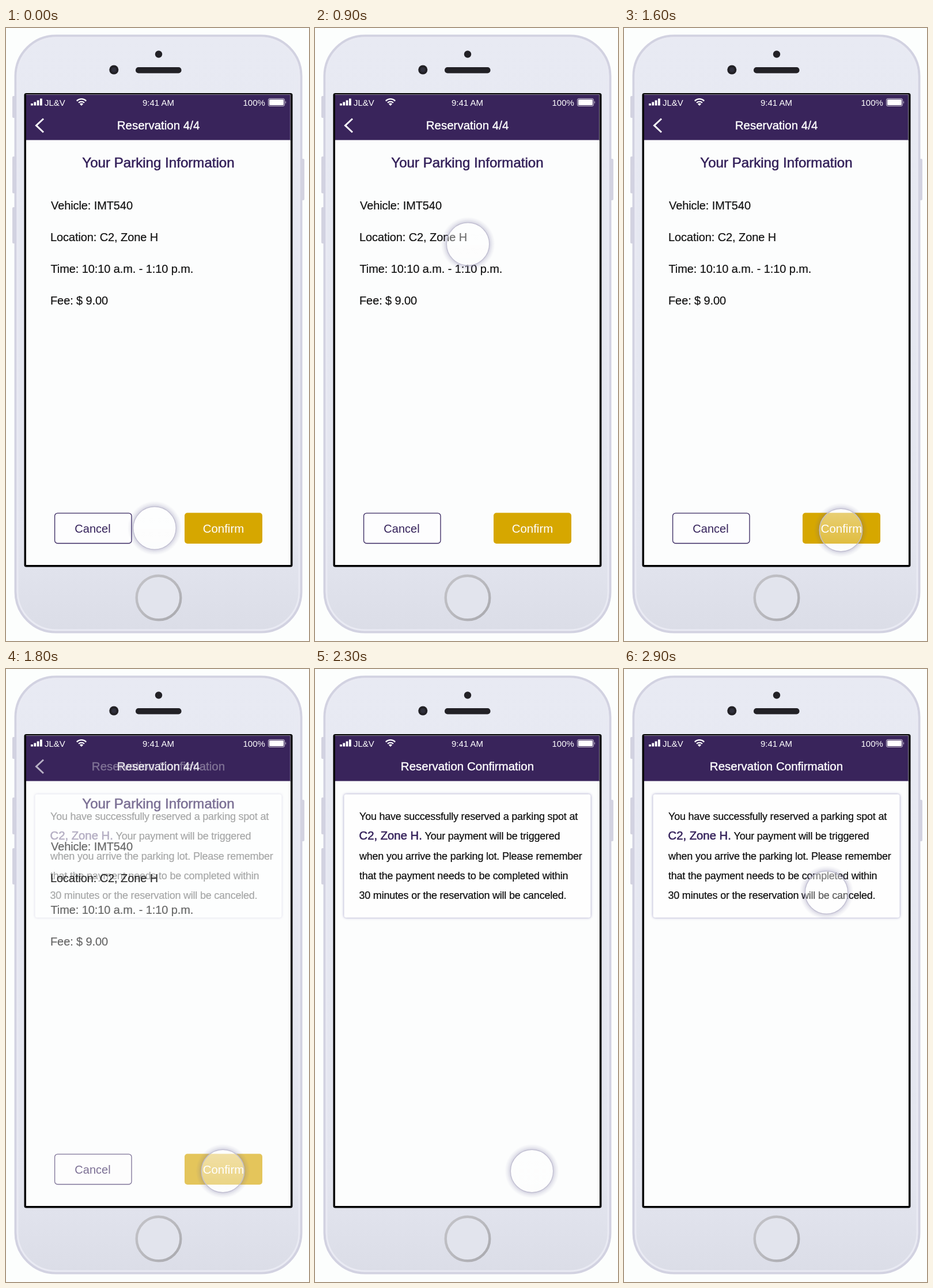
Write an HTML page that moves like this. It is 526x1064 px and loops after 3000 ms.

```html
<!DOCTYPE html>
<html lang="en">
<head>
<meta charset="utf-8">
<title>Parking reservation</title>
<style>
  html, body { margin: 0; width: 100%; height: 100%; overflow: hidden; background: #fcfefd; }
  svg { display: block; width: 100%; height: 100%; }
  text { font-family: "Liberation Sans", Arial, sans-serif; white-space: pre; }
  .mid { text-anchor: middle; }
  .status { font-size: 15px; fill: #fff; }
  .title { font-size: 20.5px; fill: #fff; stroke: #fff; stroke-width: .4px; }
  .info { font-size: 20px; letter-spacing: -.1px; fill: #111; stroke: #111; stroke-width: .2px; }
  .note { font-size: 18px; letter-spacing: -.22px; fill: #0c0c0c; stroke: #0c0c0c; stroke-width: .2px; }
  .strong { fill: #34215a; stroke: #34215a; stroke-width: .55px; }
</style>
</head>
<body>
<svg viewBox="0 0 526 1064">
  <defs>
    <linearGradient id="shell" x2="0" y2="1">
      <stop offset="0" stop-color="#e8eaf3"/>
      <stop offset=".85" stop-color="#e3e5ef"/>
      <stop offset="1" stop-color="#dbdde7"/>
    </linearGradient>
    <linearGradient id="metal" x2="1" y2="1">
      <stop offset="0" stop-color="#c3c3c8"/>
      <stop offset=".5" stop-color="#b9b9be"/>
      <stop offset="1" stop-color="#a8a8ad"/>
    </linearGradient>
    <linearGradient id="glass" x2="0" y2="1">
      <stop offset="0" stop-color="#fff" stop-opacity=".48"/>
      <stop offset="1" stop-color="#fff" stop-opacity=".2"/>
    </linearGradient>
    <radialGradient id="halo">
      <stop offset=".78" stop-color="#5f5990" stop-opacity="0"/>
      <stop offset=".79" stop-color="#5f5990" stop-opacity=".25"/>
      <stop offset=".9" stop-color="#5f5990" stop-opacity=".09"/>
      <stop offset="1" stop-color="#5f5990" stop-opacity="0"/>
    </radialGradient>
    <filter id="soft" x="-5%" y="-5%" width="110%" height="110%">
      <feDropShadow dx="0" dy="0" stdDeviation="2" flood-color="#7f78b4" flood-opacity=".85"/>
    </filter>
  </defs>

  <!-- phone -->
  <g fill="#d3d3e0">
    <rect x="11" y="118" width="6" height="38" rx="2"/>
    <rect x="11" y="223" width="6" height="64" rx="2"/>
    <rect x="11" y="311" width="6" height="63" rx="2"/>
    <rect x="511" y="227" width="7" height="72" rx="2"/>
  </g>
  <rect x="16.5" y="13.5" width="496" height="1035" rx="70" fill="url(#shell)" stroke="#d2d2e1" stroke-width="4"/>
  <rect x="20" y="17" width="489" height="1028" rx="67" fill="none" stroke="#e9eaf3" stroke-width="3"/>
  <g fill="#222126">
    <circle cx="265" cy="45.5" r="6.2"/>
    <circle cx="187.3" cy="72.5" r="8"/>
    <rect x="225" y="68" width="79.5" height="10.5" rx="5"/>
  </g>
  <circle cx="187.3" cy="72.5" r="4" fill="#30303c"/>
  <circle cx="265" cy="989" r="38.3" fill="#e2e4ed" stroke="url(#metal)" stroke-width="4.4"/>

  <!-- screen -->
  <rect x="31.5" y="113" width="466" height="822.5" rx="3.5"/>
  <rect x="35" y="116" width="459" height="816" fill="#fcfdfd"/>
  <rect x="35" y="116" width="459" height="78.5" fill="#39245b"/>
  <path d="M35 115.5H493.7V194" fill="none" stroke="#8d8796"/>
  <path d="M45 134.5v-3.5M50.3 134.5v-6M55.6 134.5v-9M60.9 134.5v-12" stroke="#fff" stroke-width="3.8"/>
  <g fill="none" stroke="#fff" stroke-width="2.2">
    <path d="M122.8 126.6a11.6 11.6 0 0 1 16.4 0"/>
    <path d="M126 129.8a7.1 7.1 0 0 1 10 0"/>
  </g>
  <path d="M131 135l-3.1-3.2a4.4 4.4 0 0 1 6.2 0z" fill="#fff"/>
  <rect x="455.5" y="122.5" width="28" height="13" rx="2.5" fill="none" stroke="#fff" stroke-opacity=".75"/>
  <rect x="457" y="124" width="25" height="10" rx="1.3" fill="#fff"/>
  <path d="M485 126.5q2 2.5 0 5z" fill="#fff" opacity=".75"/>
  <text class="status" x="67" y="135">JL&amp;V</text>
  <text class="status mid" x="264.5" y="135">9:41 AM</text>
  <text class="status" x="411.5" y="135">100%</text>

  <!-- confirmation page -->
  <g id="done">
    <text class="title mid" x="264.5" y="176">Reservation Confirmation</text>
    <rect x="50.5" y="217.5" width="428" height="214" rx="4" fill="#fefefe" filter="url(#soft)"/>
    <g class="note">
      <text x="77" y="262">You have successfully reserved a parking spot at</text>
      <text class="strong" x="76.5" y="296" style="font-size:20.3px;letter-spacing:0">C2, Zone H.</text>
      <text x="190.5" y="296">Your payment will be triggered</text>
      <text x="77" y="330.5">when you arrive the parking lot. Please remember</text>
      <text x="77" y="364.5">that the payment needs to be completed within</text>
      <text x="76.5" y="398.5">30 minutes or the reservation will be canceled.</text>
    </g>
  </g>

  <!-- review page -->
  <g id="review">
    <path d="M65 157.5L52.5 169.2L65 181" fill="none" stroke="#fff" stroke-width="3"/>
    <text class="strong mid" x="264.5" y="242" font-size="24.1">Your Parking Information</text>
    <g class="info">
      <text x="78" y="314.5">Vehicle: IMT540</text>
      <text x="77.5" y="424.5">Time: 10:10 a.m. - 1:10 p.m.</text>
      <text x="77" y="479.5">Fee: $ 9.00</text>
    </g>
    <rect x="84.6" y="842.1" width="133.4" height="52.4" rx="5" fill="#fdfdfe" stroke="#37265f" stroke-width="1.3"/>
    <rect x="310" y="841.5" width="135" height="53.5" rx="5" fill="#d6a700"/>
    <text class="mid" x="150.5" y="875.7" font-size="20" fill="#34215a">Cancel</text>
    <text class="mid" x="377.5" y="875.7" font-size="20.4" fill="#fff">Confirm</text>
  </g>
  <g id="late">
    <text class="title mid" x="264.5" y="176">Reservation 4/4</text>
    <text class="info" x="77" y="369.5">Location: C2, Zone H</text>
  </g>

  <g id="touch">
    <circle r="47" fill="url(#halo)"/>
    <circle r="37.2" fill="url(#glass)" stroke="#c2c0d2" stroke-width="1.4"/>
  </g>
</svg>
<script>
  const LOOP = 3000, STEP = 100;
  // time, x, y of the finger
  const path = [
    [0, 258, 868], [200, 258.5, 866], [300, 259.5, 862], [400, 261, 853],
    [500, 290, 608], [600, 266, 405], [700, 245, 318], [800, 249, 328],
    [900, 265.5, 375], [1000, 305, 485], [1100, 345, 600], [1200, 379, 708],
    [1300, 403.5, 791], [1400, 400, 842], [1500, 384, 866], [1600, 376.5, 871.5],
    [2400, 376.5, 871.5], [2600, 375, 862], [2700, 371, 826], [2800, 356, 642],
    [2900, 351.5, 388]
  ];
  const el = id => document.getElementById(id);
  const fade = (id, a) => el(id).setAttribute("opacity", a);

  function pointAt(t) {
    const i = path.findIndex(p => p[0] >= t);
    if (i < 1) return path[0].slice(1);
    const [a, b] = [path[i - 1], path[i]];
    const k = (t - a[0]) / (b[0] - a[0]);
    return [1, 2].map(n => a[n] + (b[n] - a[n]) * k);
  }

  function draw(now) {
    const t = Math.floor(now % LOOP / STEP) * STEP;
    const k = Math.min(1, Math.max(0, (t - 1700) / 500));
    const p = 1 - (1 - k) ** 2;
    fade("done", p);
    fade("review", 1 - p);
    fade("late", 1 - p * p);
    el("touch").setAttribute("transform", `translate(${pointAt(t)})`);
  }

  let start;
  function tick(now) {
    start ??= now;
    draw(now - start);
    requestAnimationFrame(tick);
  }
  draw(0);
  requestAnimationFrame(tick);
</script>
</body>
</html>
```
